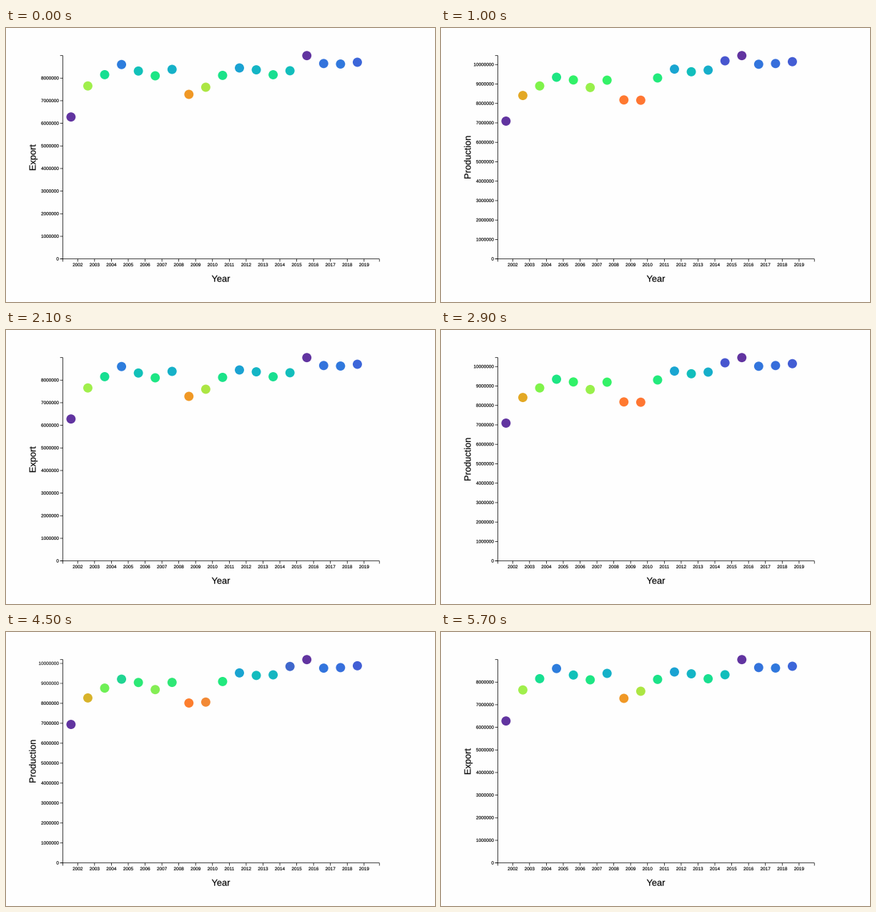
Write a matplotlib script that moves like this. It is 600 px wide and 384 px high and loops after 5.8 s.

```python
import numpy as np
import matplotlib.pyplot as plt
from matplotlib.animation import FuncAnimation
from matplotlib.patches import Circle, PathPatch
from matplotlib.textpath import TextPath
from matplotlib.transforms import Affine2D

W, H, DPI = 600, 384, 100
PX = 72 / DPI
FRAMES, STEP = 58, 100

LEFT, RIGHT, TOP, BASE = 79.5, 522.2, 38.7, 323.65
TICK, SMALL, LARGE = 3.8, 6.4, 12.8
BAND = 23.56
DURATION = 250
SWITCHES = [340, 1369, 2386, 3336, 4336, 5336]
UNIT = (31.675, 27.24)  # pixels per million: export, production

EXPORT_Y = np.array([124.7, 81.2, 65.4, 51.2, 60.3, 67.0, 58.0, 93.0, 83.0,
                     66.4, 56.0, 58.6, 65.5, 59.9, 38.7, 49.8, 50.5, 48.0])
PRODUCTION_Y = np.array([130.5, 94.6, 81.2, 69.0, 72.8, 83.4, 73.1, 100.8, 101.2,
                         70.0, 57.6, 61.3, 59.0, 46.0, 38.7, 50.8, 49.8, 47.2])


def rainbow(ys):
    """Cyclic cubehelix rainbow over the range of the values."""
    t = (ys.max() - ys) / (ys.max() - ys.min())
    d = np.abs(t - 0.5)
    light = 0.8 - 0.9 * d
    amp = (1.5 - 1.5 * d) * light * (1 - light)
    hue = np.radians(360 * t + 20)
    c, s = np.cos(hue), np.sin(hue)
    rgb = [light + amp * (-0.14861 * c + 1.78277 * s),
           light + amp * (-0.29227 * c - 0.90649 * s),
           light + amp * 1.97294 * c]
    return np.clip(np.stack(rgb, axis=1), 0, 1) ** 1.15


def ease(t):
    t = min(max(t, 0), 1)
    return 4 * t ** 3 if t < 0.5 else 1 - 4 * (1 - t) ** 3


def lerp(a, b, m):
    return a + (b - a) * m


fig = plt.figure(figsize=(W / DPI, H / DPI), dpi=DPI, facecolor="#fefefe")
ax = fig.add_axes([0, 0, 1, 1])
ax.set_xlim(0, W)
ax.set_ylim(H, 0)
ax.axis("off")


def stroke(xs, ys):
    return ax.plot(xs, ys, color="black", lw=0.75 * PX, snap=False,
                   solid_capstyle="butt", solid_joinstyle="miter")[0]


def text(string, x, y, size, align=0.5, angle=0):
    path = TextPath((0, 0), string, size=size, prop={"family": "Liberation Sans"})
    box = path.get_extents()
    shift = Affine2D().translate(-lerp(box.x0, box.x1, align), 0)
    place = shift.scale(1, -1).rotate_deg(angle).translate(x, y)
    patch = PathPatch(place.transform_path(path), fc="black", ec="black", lw=0.15 * PX)
    return ax.add_patch(patch)


# Fixed axes
stroke([LEFT - TICK, LEFT, LEFT, LEFT - TICK], [TOP, TOP, BASE, BASE])
stroke([LEFT, LEFT, RIGHT, RIGHT], [BASE + TICK, BASE, BASE, BASE + TICK])
for i in range(18):
    x = 100.3 + BAND * i
    stroke([x, x], [BASE, BASE + TICK])
    text(str(2002 + i), x, BASE + 16.1 * 0.64, SMALL)
text("Year", 300.5, 355.6, LARGE)

titles = [text(name, 41.5, 181.2, LARGE, angle=-90) for name in ("Export", "Production")]

ticks = []
for k in range(11):
    mark = stroke([LEFT - TICK, LEFT], [0, 0])
    label = text(str(k * 1000000), LEFT - 5.8, 0.32 * SMALL, SMALL, align=1)
    ticks.append((mark, label))

dots = [ax.add_patch(Circle((90.9 + BAND * i, 0), 6.45, lw=0)) for i in range(18)]
export_rgb, production_rgb = rainbow(EXPORT_Y), rainbow(PRODUCTION_Y)


def draw(frame):
    now = frame * STEP
    started = [s for s in SWITCHES if s <= now]
    production = len(started) % 2
    done = ease((now - started[-1]) / DURATION) if started else 1
    mix = done if production else 1 - done

    for i, title in enumerate(titles):
        title.set_visible(i == production)

    unit = lerp(*UNIT, mix)
    for k, parts in enumerate(ticks):
        move = Affine2D().translate(0, BASE - k * unit) + ax.transData
        for part in parts:
            part.set_transform(move)
            part.set_alpha(mix if k > 8 else 1)

    ys = lerp(EXPORT_Y, PRODUCTION_Y, mix)
    colors = lerp(export_rgb, production_rgb, mix)
    for dot, y, color in zip(dots, ys, colors):
        dot.center = (dot.center[0], y)
        dot.set_facecolor(color)
    return dots


anim = FuncAnimation(fig, draw, frames=FRAMES, interval=STEP, repeat=True,
                     repeat_delay=0, blit=False)
plt.show()
```
